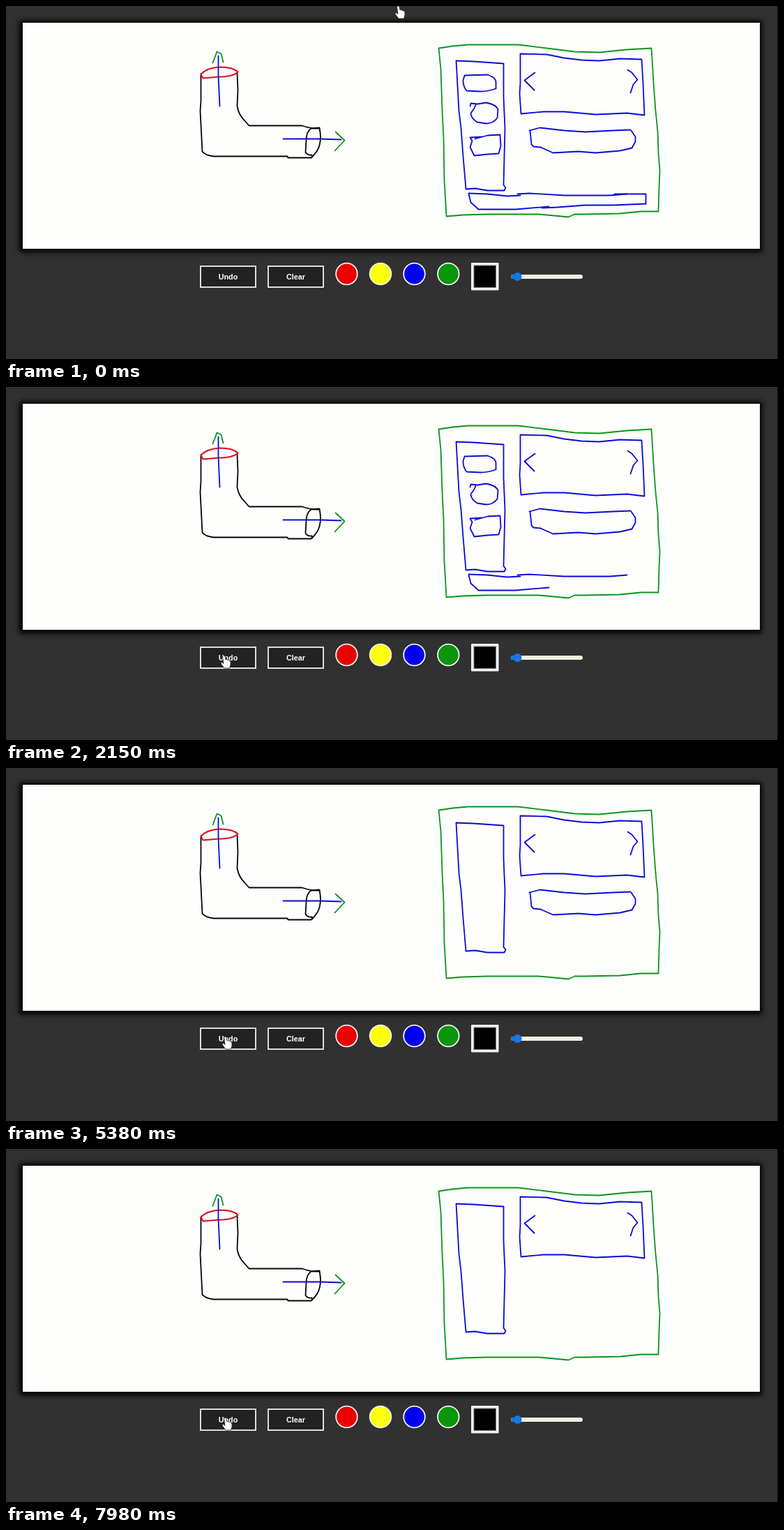
An HTML page that plays this animation: 1107 px wide and 506 px high, repeating every 8 s.

```html
<!DOCTYPE html>
<html lang="en">
<head>
<meta charset="utf-8">
<title>Drawing board</title>
<style>
  html, body { margin: 0; width: 100%; height: 100%; overflow: hidden; background: #313131; }
  svg { position: absolute; left: 0; top: 0; display: block; }
  #board { position: absolute; left: 24px; top: 24px; width: 1057px; height: 324px;
    background: #fefefd; box-shadow: -1px 1px 7px 4px #000; }
  #drawing path { fill: none; stroke-width: 1.8; stroke-linejoin: round; stroke-linecap: round; }
  .black { stroke: #050505; }
  .red { stroke: #d8101c; }
  .blue { stroke: #0c0ad4; }
  .green { stroke: #0c941a; }
  .button rect { fill: #222; stroke: #f0f0f0; stroke-width: 1.8; }
  .button text { font: bold 10.800px "Liberation Sans", Arial, sans-serif; fill: #fff; text-anchor: middle; }
  #swatches circle { stroke: #f4f4f4; stroke-width: 1.8; }
  #cursor path { fill: #fff; stroke: #222; stroke-width: .8; stroke-linejoin: round; }
</style>
</head>
<body>
<div id="board"></div>
<svg width="1107" height="506" viewBox="0 0 1107 506">
  <rect x="1106" width="1" height="506" fill="#0a0a0a"/>
  <g id="drawing" transform="translate(.5 .5)">
    <!-- pipe -->
    <path class="black" d="M279 97L279 135 278 150 281 208Q284 213 297 215L403 215 404 217 437 217Q447 208 449 199Q452 188 449 175"/>
    <path class="black" d="M331 95L332 120 331 143Q333 155 341 163L348 171 424 171Q438 176 449 175"/>
    <path class="black" d="M449 174L437 175Q430 180 430 192L429 209Q432 214 438 213L439 216"/>
    <path class="red" d="M279 97Q288 88 306 87Q325 87 332 94Q325 101 305 101L282 103 279 97"/>
    <path class="blue" d="M304 71L304 100 306 143M397 190L450 190 480 191"/>
    <path class="green" d="M296 81L302 65 308 68 311 80M472 180L485 192 471 207"/>
    <!-- page layout -->
    <path class="green" d="M620 60L640 57 662 55 734 55 775 60 815 65 850 66 890 62 925 60 926 75 928 110 931 150 934 180 935 210 937 235 936 260 935 294 910 294 880 297 830 298 815 298 806 302 775 299 763 298 690 298 655 299 631 301 628 250 627 190 625 150 623 90Z"/>
    <path class="blue" d="M737 68L737 110 736 125 738 154 770 151 800 151 845 155 890 153 915 156 913 110 911 76 880 75 850 78 825 77 800 74 775 69Z"/>
    <path class="blue" d="M758 95L743 106 757 120M891 91L897 95 905 105 899 112 895 124"/>
    <path class="blue" d="M713 82L670 79 645 78 649 150 652 175 655 215 659 262 672 261 690 264 714 264 716 260 713 256 715 175 713 130Z"/>
    <!-- strokes taken back by Undo, with the time of each click -->
    <path class="blue" data-until="6950" d="M751 178L753 198 756 201 766 202"/>
    <path class="blue" data-until="6350" d="M766 202L784 210 820 208 845 210 880 207 897 203"/>
    <path class="blue" data-until="5950" d="M897 203L902 194 902 187 896 178"/>
    <path class="blue" data-until="5600" d="M750 178L765 174 800 178 830 180 870 178 895 177"/>
    <path class="blue" data-until="5100" d="M657 99L690 98Q703 102 702 110L702 118Q690 122 680 122L660 121Q655 115 655 106Z"/>
    <path class="blue" data-until="4650" d="M665 143L666 139 676 140 688 138Q703 141 705 148L704 160Q698 168 688 168L675 166Q666 160 666 153L671 146 673 141"/>
    <path class="blue" data-until="4200" d="M682 187L665 188 668 193 665 202 671 214 690 212 706 211 709 200 708 184 690 185 672 190"/>
    <path class="blue" data-until="3400" d="M663 268L690 269 718 272 737 271"/>
    <path class="blue" data-until="2950" d="M733 269L750 268 800 271 865 271 890 269"/>
    <path class="blue" data-until="2500" d="M663 269L666 281 677 291 730 291 778 287"/>
    <path class="blue" data-until="2020" d="M768 289L790 288 830 285 870 285 917 283"/>
    <path class="blue" data-until="1650" d="M917 283L917 269 872 269"/>
  </g>

  <g class="button"><rect x="279" y="373" width="79" height="30"/><text x="318.500" y="392">Undo</text></g>
  <g class="button"><rect x="376" y="373" width="79" height="30"/><text x="415.500" y="392">Clear</text></g>
  <g id="swatches">
    <circle cx="488.500" cy="384" r="15.300" fill="#eb0000"/>
    <circle cx="537" cy="384" r="15.300" fill="#ffff0a"/>
    <circle cx="585.500" cy="384" r="15.300" fill="#0000ee"/>
    <circle cx="634.300" cy="384" r="15.300" fill="#0b960c"/>
  </g>
  <rect x="667" y="368" width="39.500" height="39.500" rx="1" fill="#f0f0f0"/>
  <rect x="671" y="372" width="31.500" height="31.500" fill="#000" stroke="#777"/>
  <rect x="724" y="385" width="103" height="6" rx="3" fill="#f0eee2"/>
  <path d="M727 385H733V391H727A3 3 0 0 1 727 385" fill="#1478e6"/>
  <circle cx="733.500" cy="388" r="6" fill="#1478e6"/>

  <g id="cursor">
    <path id="arrow" d="M0 0V14L3 11 5.500 16.500 8 15.500 5.500 10.500H10Z"/>
    <path id="hand" d="M-1.500 1Q.5-1 2 1L3 6Q5 4.500 6 6.500Q7.500 5.500 8.500 7.500Q10 7.500 10 9V13L8.500 18H1L-3.500 12Q-4.500 9.500-2.500 9.500L0 11.500Z"/>
  </g>
</svg>
<script>
  const LOOP = 8000;
  const $ = id => document.getElementById(id);
  const strokes = [...document.querySelectorAll('[data-until]')];
  const show = (el, on) => { el.style.display = on ? '' : 'none'; };

  // Pointer stops: time, x, y
  const stops = [[0, 562, 0], [200, 562, 0], [900, 310, 371], [1080, 310, 371],
                 [1300, 312, 385], [2500, 312, 385], [2700, 314, 385], [LOOP, 314, 385]];

  function pointerAt(t) {
    const i = stops.findIndex(s => s[0] > t);
    const [t0, x0, y0] = stops[i - 1], [t1, x1, y1] = stops[i];
    const u = (t - t0) / (t1 - t0), e = u * u * (3 - 2 * u);
    return [x0 + (x1 - x0) * e, y0 + (y1 - y0) * e];
  }

  const start = performance.now();

  function draw(now) {
    const t = Math.max(0, now - start) % LOOP;
    const [x, y] = pointerAt(t);
    const isHand = y > 373 || t < 200;
    $('cursor').setAttribute('transform', `translate(${x} ${y})`);
    show($('hand'), isHand);
    show($('arrow'), !isHand);
    for (const s of strokes) show(s, t < +s.dataset.until);
    requestAnimationFrame(draw);
  }
  draw(start);
</script>
</body>
</html>
```
